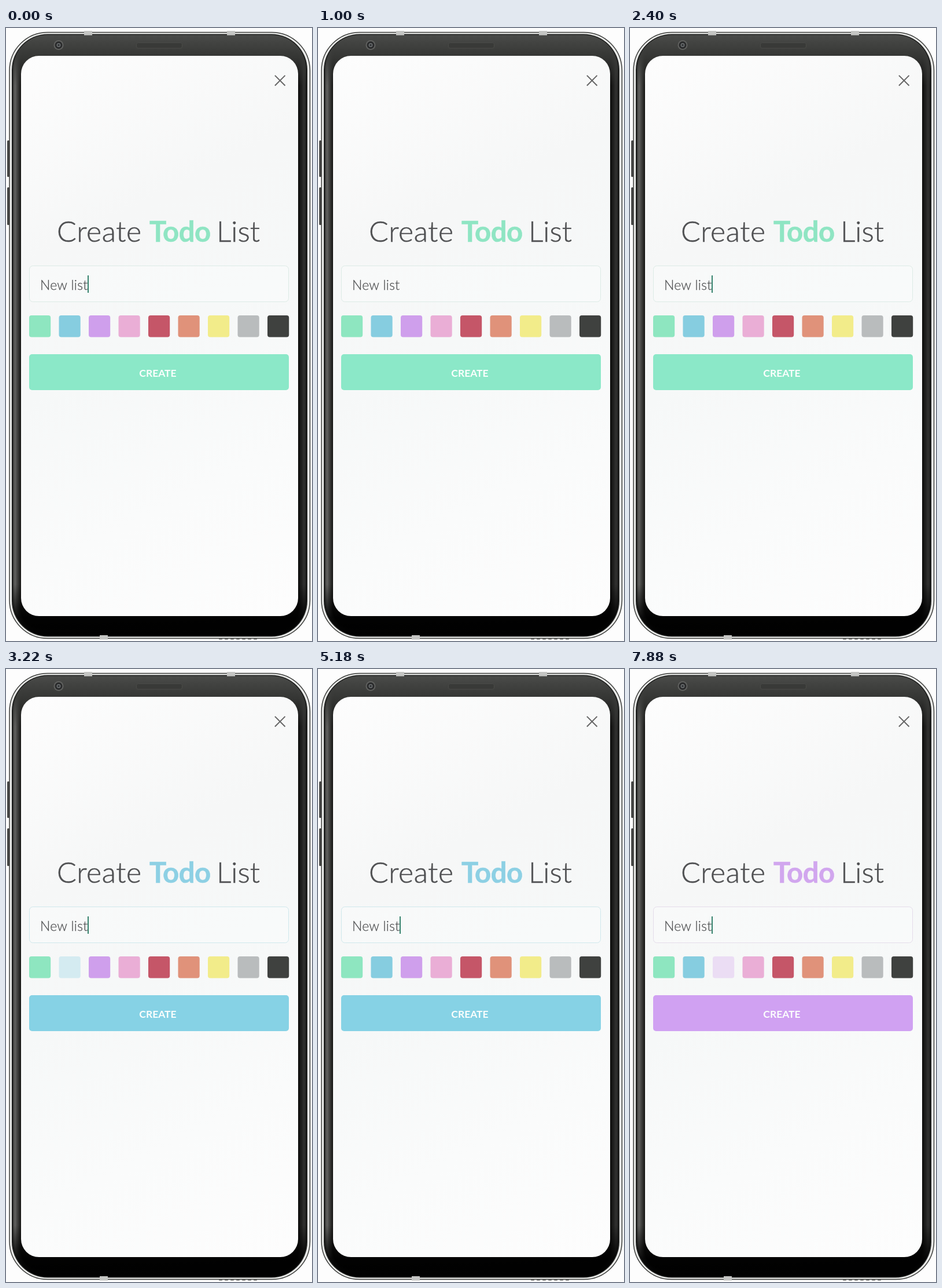
Write an HTML page with a canvas that moves like this. It is 529 px wide and 1058 px high and loops after 8000 ms.

```html
<!DOCTYPE html>
<html lang="en">
<head>
<meta charset="utf-8">
<title>Create list</title>
<style>
  html, body { margin: 0; width: 100%; height: 100%; overflow: hidden; background: #fdfdfd; }
  canvas { display: block; width: 529px; height: 1058px; }
</style>
</head>
<body>
<canvas id="stage"></canvas>
<script>
const W = 529, H = 1058, LOOP = 8000;
const canvas = document.getElementById('stage');
const ctx = canvas.getContext('2d');
const ratio = window.devicePixelRatio || 1;
canvas.width = Math.round(W * ratio);
canvas.height = Math.round(H * ratio);
ctx.scale(ratio, ratio);

const INK = '#505153';
const SWATCHES = ['#8ee6c0', '#86cde0', '#cf9fec', '#eaaed6', '#c55668',
                  '#e0927a', '#f2ec8a', '#b9bcbd', '#3f413f'];
const THEMES = [
  { from: 0, text: '#8fe5c3', edge: '#dcebe6', fill: '#8be8c8' },
  { from: 3060, text: '#8dd0e4', edge: '#cfe8ec', fill: '#86d2e5' },
  { from: 7600, text: '#d1a6ee', edge: '#e4dcea', fill: '#d0a1f2' }
];
const PRESSES = [{ swatch: 1, from: 2900, to: 3440 }, { swatch: 2, from: 7440, to: LOOP }];
const CARET_ON = [[0, 530], [1030, 1530], [2030, 2530], [3030, 3530],
                  [4030, 4460], [5040, 5600], [6520, 7020], [7600, LOOP]];

const within = (t, from, to) => t >= from && t < to;

function box(x, y, w, h, r, fill, stroke, line = 1) {
  ctx.beginPath();
  ctx.roundRect(x, y, w, h, r);
  if (fill) { ctx.fillStyle = fill; ctx.fill(); }
  if (stroke) { ctx.strokeStyle = stroke; ctx.lineWidth = line; ctx.stroke(); }
}

function gradient(x0, y0, x1, y1, ...stops) {
  const g = ctx.createLinearGradient(x0, y0, x1, y1);
  for (const [at, color] of stops) g.addColorStop(at, color);
  return g;
}

// A thin outline of the same colour gives light text a little more body
function label(str, x, y, { size, weight, color, spacing = 0, align = 'left', body = 0 }) {
  ctx.font = `${weight} ${size}px Lato, sans-serif`;
  ctx.letterSpacing = `${spacing}px`;
  ctx.textAlign = align;
  ctx.fillStyle = ctx.strokeStyle = color;
  ctx.fillText(str, x, y);
  if (body) { ctx.lineWidth = body; ctx.strokeText(str, x, y); }
}

function disc(x, y, r, color) {
  ctx.beginPath();
  ctx.arc(x, y, r, 0, Math.PI * 2);
  ctx.fillStyle = color;
  ctx.fill();
}

function drawBezel() {
  const x = 12, y = 12, w = 507, h = 1037, depth = 14;
  for (let d = 0; d < depth; d++) {
    const tone = d < 3 ? 62 + d * 12 : 98 - (d - 3) * 7.5;
    box(x + d, y + d, w - 2 * d, h - 2 * d, 60 - 2 * d, `rgb(${tone},${tone},${tone - 2})`);
  }
  box(x, y, w, h, 60, gradient(x, 0, x + w, 0,
    [0, 'rgba(0,0,0,0)'], [0.5, 'rgba(0,0,0,.1)'], [1, 'rgba(0,0,0,.5)']));
  box(x, y, w, h, 60, gradient(0, y, 0, 100,
    [0, '#4a4b49'], [0.3, '#3b3c3a'], [0.45, 'rgba(56,57,55,.9)'], [1, 'rgba(56,57,55,0)']));
  box(x, y, w, h, 60, gradient(0, 960, 0, y + h,
    [0, 'rgba(0,0,0,0)'], [0.65, 'rgba(0,0,0,.9)'], [1, '#000']));
}

function drawPhone() {
  ctx.fillStyle = '#fdfdfd';
  ctx.fillRect(0, 0, W, H);

  // Side keys
  box(2, 194, 4, 63, 1.5, '#454644');
  box(2, 275, 4, 65, 1.5, '#454644');

  // Metal rim
  box(6, 7.5, 519.5, 1046, 66, '#e9eae8', '#3c3d3b', 1.5);
  box(10, 10.5, 511, 1040, 62, '#1a1b1a');

  drawBezel();

  // Antenna bands
  for (const [x, y] of [[135, 5], [382, 5], [162, 1048]]) box(x, y, 14, 7.5, 0, '#c4c5c3');
  for (let x = 368; x < 430; x += 10) box(x, 1054, 6, 1.5, 1, '#6a6b69');

  // Camera and earpiece
  disc(91, 29.5, 8.5, '#60615f');
  disc(91, 29.5, 6.5, '#292a2b');
  disc(91, 29.5, 3.5, '#676a6c');
  disc(91, 29.5, 1.8, '#303335');
  box(225.5, 25.5, 79, 9.5, 3, '#393a38', '#4a4b48');

  box(26, 48, 479, 967, 31, gradient(26, 48, 505, 1015,
    [0, '#fdfdfd'], [0.3, '#f6f7f7'], [0.5, '#f6f8f8'], [0.75, '#fafbfb'], [1, '#fdfdfd']));
}

function drawCross(x, y, r) {
  ctx.beginPath();
  ctx.moveTo(x - r, y - r); ctx.lineTo(x + r, y + r);
  ctx.moveTo(x + r, y - r); ctx.lineTo(x - r, y + r);
  ctx.strokeStyle = '#666';
  ctx.lineWidth = 2;
  ctx.stroke();
}

function drawForm(t) {
  const theme = THEMES.filter(th => t >= th.from).pop();
  const light = { size: 50, weight: 300, color: INK, body: 0.6 };

  drawCross(473.7, 90.7, 8.8);

  label('Create', 88, 369, { ...light, spacing: 0.6 });
  label('Todo', 248, 369, { size: 49, weight: 700, color: theme.text, spacing: -0.5, body: 0.6 });
  label('List', 364, 369, light);

  box(40.5, 410.5, 448, 62, 6, 'rgba(255,255,255,.2)', theme.edge);
  label('New list', 59, 452, { ...light, size: 23, spacing: 0.2, body: 0.3 });
  if (CARET_ON.some(([a, b]) => within(t, a, b))) box(141, 427, 2, 30, 0, '#36826d');

  SWATCHES.forEach((color, i) => {
    const pressed = PRESSES.some(p => p.swatch === i && within(t, p.from, p.to));
    ctx.globalAlpha = pressed ? 0.3 : 1;
    box(40 + i * 51.5, 496, 37.2, 37.5, 4, color);
    ctx.globalAlpha = 1;
  });

  box(40, 563, 449, 62, 5, theme.fill);
  label('CREATE', 262.5, 602, { size: 17.5, weight: 700, color: '#fbfefd', align: 'center' });
}

const start = performance.now();
function tick() {
  drawPhone();
  drawForm((performance.now() - start) % LOOP);
  requestAnimationFrame(tick);
}
tick();
</script>
</body>
</html>
```
